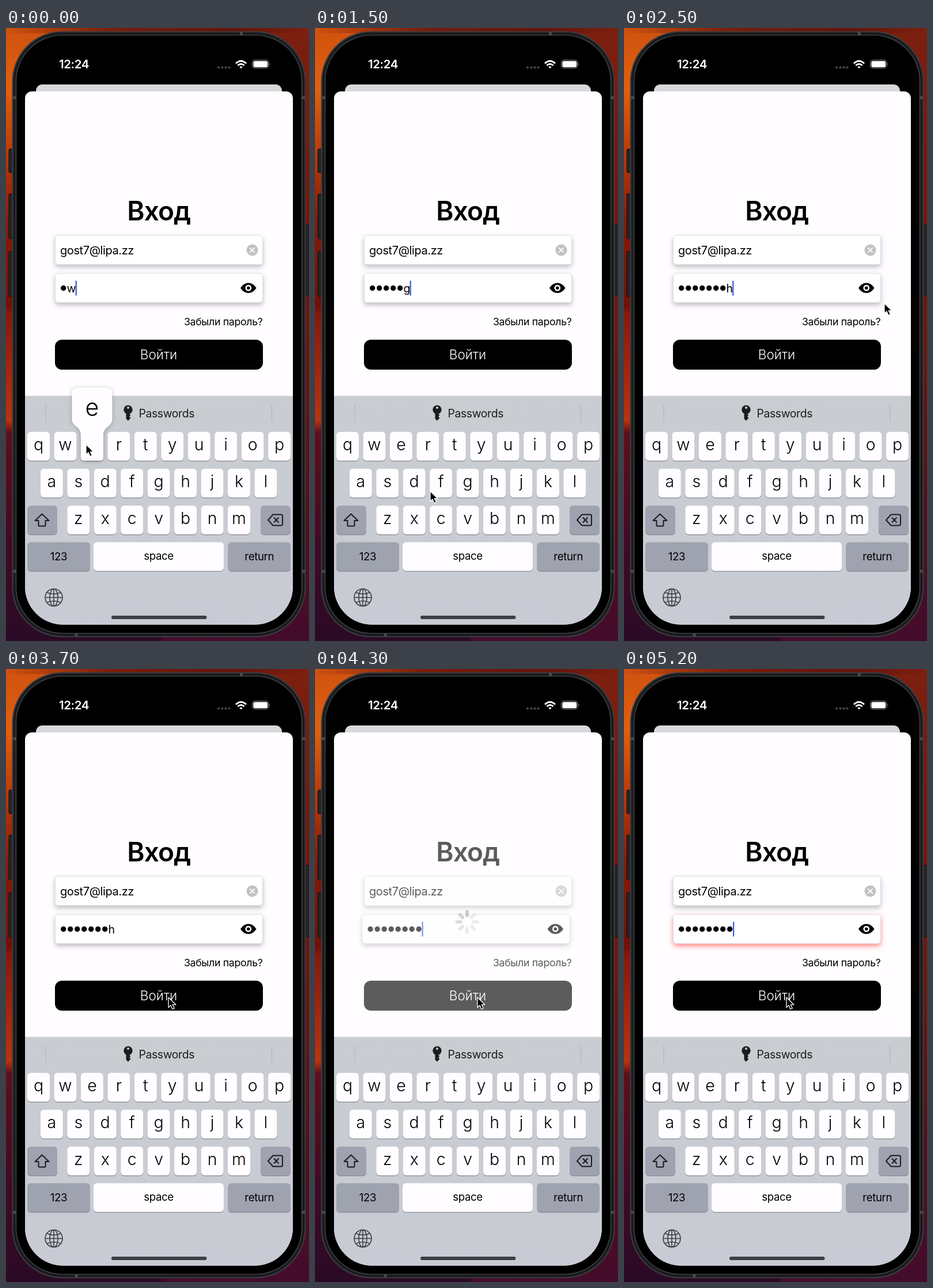
An HTML page for the animation above (5.3 s loop, 526 by 1064 pixels).

```html
<!DOCTYPE html>
<html lang="ru">
<head>
<meta charset="utf-8">
<title>Вход</title>
<style>
  html, body { margin: 0; width: 100%; height: 100%; overflow: hidden; background: #000; }
  svg { display: block; width: 100%; height: 100%; }
  text { font-family: Inter, Roboto, sans-serif; letter-spacing: -.02em; fill: #000; }
  .mid { text-anchor: middle; }
  .light { font-weight: 350; letter-spacing: 0; }
  .field { fill: #fff; stroke: #dedde1; stroke-width: 1; filter: drop-shadow(0 4px 4.5px rgba(0,0,0,.25)); }
  .popup { filter: drop-shadow(0 1px 3.5px rgba(0,0,0,.24)); }
  .line { fill: none; stroke: #1c1c1f; stroke-width: 2; stroke-linejoin: round; stroke-linecap: round; }
</style>
</head>
<body>
<svg viewBox="0 0 526 1064" preserveAspectRatio="none">
  <defs>
    <linearGradient id="wallLeft" x2="0" y2="1">
      <stop offset="0" stop-color="#cf520f"/><stop offset=".1" stop-color="#e0600f"/>
      <stop offset=".2" stop-color="#b93c0a"/><stop offset=".32" stop-color="#861a07"/>
      <stop offset=".455" stop-color="#701109"/><stop offset=".465" stop-color="#86180c"/>
      <stop offset=".58" stop-color="#a92a0d"/><stop offset=".64" stop-color="#b5350f"/>
      <stop offset=".66" stop-color="#5d0f1a"/><stop offset=".85" stop-color="#3f0a25"/>
      <stop offset="1" stop-color="#2a0a26"/>
    </linearGradient>
    <linearGradient id="wallRight" x2="0" y2="1">
      <stop offset="0" stop-color="#7c2010"/><stop offset=".25" stop-color="#7c1409"/>
      <stop offset=".5" stop-color="#73140c"/><stop offset=".75" stop-color="#561018"/>
      <stop offset="1" stop-color="#430c2c"/>
    </linearGradient>
    <linearGradient id="wallTop">
      <stop offset="0" stop-color="#cf520f"/><stop offset=".35" stop-color="#7a1d0b"/>
      <stop offset=".75" stop-color="#64140a"/><stop offset="1" stop-color="#7c2010"/>
    </linearGradient>
    <linearGradient id="board" x2="0" y2="1">
      <stop offset="0" stop-color="#c9cdd1"/><stop offset="1" stop-color="#c8cbd4"/>
    </linearGradient>
    <clipPath id="screen"><rect x="33" y="30" width="465" height="1005.500" rx="66"/></clipPath>
  </defs>

  <rect width="270" height="1064" fill="url(#wallLeft)"/>
  <rect x="270" width="256" height="1064" fill="url(#wallRight)"/>
  <rect width="526" height="9" fill="url(#wallTop)"/>

  <g fill="#242427" stroke="#0c0c0e">
    <rect x="5" y="210" width="9" height="41" rx="2"/>
    <rect x="5" y="288" width="9" height="78" rx="2"/>
    <rect x="5" y="388" width="9" height="78" rx="2"/>
    <rect x="517" y="341" width="11" height="124" rx="2"/>
  </g>
  <rect x="11.500" y="6.500" width="508" height="1050" rx="86" fill="#1a1b1d" stroke="#3c3d41" stroke-width="2"/>
  <path d="M12 121h7M512 121h7M12 943h7M512 943h7M408.500 7v6M122 1050v6" stroke="#47484c" stroke-width="5"/>
  <rect x="17.500" y="12.500" width="496" height="1038" rx="80" fill="#000" stroke="#4b4c50" stroke-width="1.200"/>

  <text x="92" y="70" font-size="20.500" font-weight="600" style="fill:#fff">12:24</text>
  <g fill="#47474a"><circle cx="369" cy="68.500" r="2.100"/><circle cx="375.500" cy="68.500" r="2.100"/><circle cx="381.500" cy="68.500" r="2.100"/><circle cx="387.500" cy="68.500" r="2.100"/></g>
  <g fill="none" stroke="#fff" stroke-width="2.800">
    <path d="M399 61.500q9-8.500 18 0M402.300 65q5.700-5 11.400 0"/>
    <path d="M405.300 67.500q2.700-2.200 5.400 0l-2.700 2.700z" fill="#fff" stroke="none"/>
  </g>
  <rect x="427.500" y="55.500" width="28.500" height="14.500" rx="4.500" fill="none" stroke="#77777a" stroke-width="1.200"/>
  <rect x="429.300" y="57.300" width="25" height="11" rx="3" fill="#fff"/>
  <path d="M457.500 60.500q2.200 2.200 0 4.500z" fill="#77777a"/>

  <g clip-path="url(#screen)">
    <rect x="52" y="98" width="427" height="40" rx="11" fill="#d9d7db"/>
    <rect x="33" y="110" width="465" height="960" rx="12" fill="#fffdff"/>

    <text class="mid" x="265" y="334" font-size="46" font-weight="600">Вход</text>
    <rect class="field" x="85.500" y="360" width="360" height="50.500" rx="5"/>
    <text x="94" y="392.500" font-size="20">gost7@lipa.zz</text>
    <circle cx="427.500" cy="385.500" r="10" fill="#c2c1c4"/>
    <path d="M423.800 381.800l7.400 7.400m0-7.400l-7.400 7.400" stroke="#fff" stroke-width="1.800" stroke-linecap="round"/>

    <g id="password">
      <rect id="passBox" class="field" x="85.500" y="426" width="360" height="50.500" rx="5"/>
      <g id="dots"></g>
      <text id="lastChar" y="459" font-size="19.500"></text>
      <rect id="caret" y="438.500" width="2.300" height="26" rx="1" fill="#3d5fdc"/>
      <path d="M407 451.200q5.500-8.700 13.800-8.700t13.800 8.700q-5.500 8.700-13.800 8.700t-13.800-8.700z"/>
      <circle cx="420.800" cy="451.200" r="5.400" fill="#fff"/>
      <circle cx="420.800" cy="451.200" r="2.800"/>
    </g>

    <text x="445.500" y="516" font-size="17.800" text-anchor="end">Забыли пароль?</text>
    <rect x="85" y="541" width="361" height="52" rx="12"/>
    <text class="mid light" x="265" y="575" font-size="22.500" style="fill:#fff">Войти</text>
    <rect id="veil" x="33" y="130" width="465" height="508" fill="#fffdff"/>
    <g id="spinner"></g>

    <rect x="33" y="638.500" width="465" height="400" fill="url(#board)"/>
    <path d="M69 654v30M461.500 654v30" stroke="#b3b7bc" stroke-width="1.300"/>
    <g fill="#1c1c1f">
      <circle cx="212" cy="662.500" r="7.700"/>
      <path d="M208.500 667h5.500v3l2.500 2-2.500 2.300 2.500 2.500-4.500 5-3.500-3.500z"/>
      <circle cx="212" cy="659" r="2" fill="#c9cdd1"/>
    </g>
    <text x="230.500" y="676" font-size="19.400" style="fill:#1c1c1f">Passwords</text>
    <g id="keys"></g>

    <path class="line" d="M62.500 843.500l-12 11.500h6v8q0 1.500 1.500 1.500h9q1.500 0 1.500-1.500v-8h6z"/>
    <path class="line" d="M463.500 844.500h14q2.500 0 2.500 2.500v14q0 2.500-2.500 2.500h-14l-8.500-9.500zM465.500 850l7.500 8m0-8l-7.500 8"/>
    <g fill="none" stroke="#3d3e44" stroke-width="1.600">
      <circle cx="83" cy="988.500" r="15"/><ellipse cx="83" cy="988.500" rx="7" ry="15"/>
      <path d="M83 973.500v30M68 988.500h30M71.500 980q11.500 5 23 0M71.500 997q11.500-5 23 0"/>
    </g>
    <rect x="183" y="1020" width="165.500" height="6" rx="3" fill="#3e3d43"/>
  </g>

  <g id="popup" class="popup">
    <path fill="#fffdff" d="M-25 624H25Q35 624 35 634V679Q35 686 29 690.500Q19.500 697 19.500 706V745Q19.500 751 13.500 751H-13.500Q-19.500 751-19.500 745V706Q-19.500 697-29 690.500Q-35 686-35 679V634Q-35 624-25 624Z"/>
    <text id="popupChar" class="mid light" y="672.500" font-size="41"></text>
  </g>
  <path id="pointer" d="M0 0V17.500L4 13.800L7 20.500L10.300 19L7.400 12.700H13Z" stroke="#fff" stroke-width="1.300" stroke-linejoin="round"/>
</svg>

<script>
const LOOP = 5300, STEP = 100, PITCH = 46.45;
const byId = id => document.getElementById(id);

function add(parent, tag, attrs, text) {
  const node = document.createElementNS('http://www.w3.org/2000/svg', tag);
  for (const name in attrs) node.setAttribute(name, attrs[name]);
  if (text) node.textContent = text;
  parent.append(node);
  return node;
}

const keyCentres = {};
function addKey(x, y, width, label, { fill = '#fffdff', size = 18.7, baseline = 30, style = 'mid' } = {}) {
  add(keys, 'rect', { x, y: y + 1.3, width, height: 50, rx: 6, fill: '#888b91' });
  add(keys, 'rect', { x, y, width, height: 50, rx: 6, fill });
  if (label) add(keys, 'text', { x: x + width / 2, y: y + baseline, class: style, 'font-size': size }, label);
}

const keys = byId('keys');
[['qwertyuiop', 37, 701], ['asdfghjkl', 59.8, 765], ['zxcvbnm', 106.3, 829]].forEach(([row, left, y]) =>
  [...row].forEach((char, i) => {
    const x = left + i * PITCH;
    keyCentres[char] = { x: x + 19.5, y };
    addKey(x, y, 39, char, { size: 28.5, baseline: 32, style: 'mid light' });
  }));
const grey = { fill: '#9fa3af', baseline: 31 };
addKey(37, 829, 52, '', grey);
addKey(442, 829, 52, '', grey);
addKey(37, 892.5, 109, '123', grey);
addKey(152, 892.5, 226, 'space');
addKey(385.5, 892.5, 108.5, 'return', grey);

const dots = Array.from({ length: 8 }, (_, i) =>
  add(byId('dots'), 'circle', { cx: 99.7 + i * 12, cy: 451.5, r: 4.7 }));
const spokes = Array.from({ length: 8 }, (_, i) =>
  add(byId('spinner'), 'rect', {
    x: -3, y: -20.5, width: 6, height: 12.5, rx: 3, fill: '#8e8d93',
    transform: `translate(264 439) rotate(${i * 45})`
  }));

// Each key press: character, time down, time released.
const presses = [['e', 0, 200], ['r', 400, 600], ['t', 800, 1000], ['g', 1200, 1400], ['f', 1600, 1800], ['h', 2000, 2200]];
const MASK_AT = 3900, VEIL_AT = 3800, ERROR_AT = 4300;

const pointerPath = [
  [0, 139, 723], [100, 141, 723], [400, 195, 727], [600, 197, 726], [800, 250, 722], [900, 259, 722],
  [1000, 262, 732], [1200, 263, 792], [1350, 259, 795], [1500, 200, 804], [1700, 208, 802],
  [2000, 309, 794], [2200, 313, 788], [2500, 452, 478], [2800, 448, 474], [3400, 282, 570], [LOOP, 282, 570]
];

const clamp = v => Math.max(0, Math.min(1, v));
const ease = v => v * v * (3 - 2 * v);

function pointerAt(t) {
  const i = pointerPath.findIndex(p => p[0] > t);
  const [t0, x0, y0] = pointerPath[i - 1], [t1, x1, y1] = pointerPath[i];
  const k = ease((t - t0) / (t1 - t0));
  return [x0 + (x1 - x0) * k, y0 + (y1 - y0) * k];
}

function drawPassword(t) {
  const typed = presses.filter(p => t >= p[2]);
  const last = typed.length ? typed[typed.length - 1][0] : 'w';
  const masked = t >= MASK_AT;
  const count = masked ? 8 : typed.length + 1;
  dots.forEach((dot, i) => dot.setAttribute('display', i < count ? 'inline' : 'none'));

  const label = byId('lastChar'), left = 93.5 + count * 12;
  label.textContent = masked ? '' : last;
  label.setAttribute('x', left);
  const end = masked ? 189.5 : left + label.getComputedTextLength();
  const caretOn = t < 2200 || Math.floor((t - 2200) / 500) % 2 === 0;
  byId('caret').setAttribute('x', end - .5);
  byId('caret').setAttribute('opacity', caretOn ? 1 : 0);

  const since = t - ERROR_AT;
  const shake = since >= 0 && since < 400 ? -3.5 * Math.cos(since / 100 * Math.PI) : 0;
  byId('password').setAttribute('transform', `translate(${shake} 0)`);
  const red = clamp(since / 300);
  byId('passBox').style.filter =
    `drop-shadow(0 4px 4.5px rgba(${255 * red},${50 * red},${40 * red},${.25 + .3 * red}))`;
}

function drawPopup(t) {
  const press = presses.find(p => t >= p[1] && t < p[2]);
  byId('popup').setAttribute('display', press ? 'inline' : 'none');
  if (!press) return;
  const { x, y } = keyCentres[press[0]];
  byId('popup').setAttribute('transform', `translate(${x} ${y - 701})`);
  byId('popupChar').textContent = press[0];
}

function drawLoading(t) {
  const shown = clamp((t - VEIL_AT + STEP) / 200) * (t < VEIL_AT ? 0 : 1 - clamp((t - ERROR_AT) / 200));
  byId('veil').setAttribute('opacity', shown * .365);
  byId('spinner').setAttribute('opacity', shown);
  const head = Math.floor((t - ERROR_AT) / 125);
  spokes.forEach((spoke, i) => {
    const age = (((head - i) % 8) + 8) % 8;
    spoke.setAttribute('opacity', Math.max(.16, .45 - age * .08));
  });
}

function draw(ms) {
  const t = Math.floor(ms % LOOP / STEP) * STEP;
  drawPassword(t);
  drawPopup(t);
  drawLoading(t);
  byId('pointer').setAttribute('transform', `translate(${pointerAt(t).join(' ')})`);
}

const start = performance.now();
function tick() {
  draw(performance.now() - start);
  requestAnimationFrame(tick);
}
tick();
</script>
</body>
</html>
```
